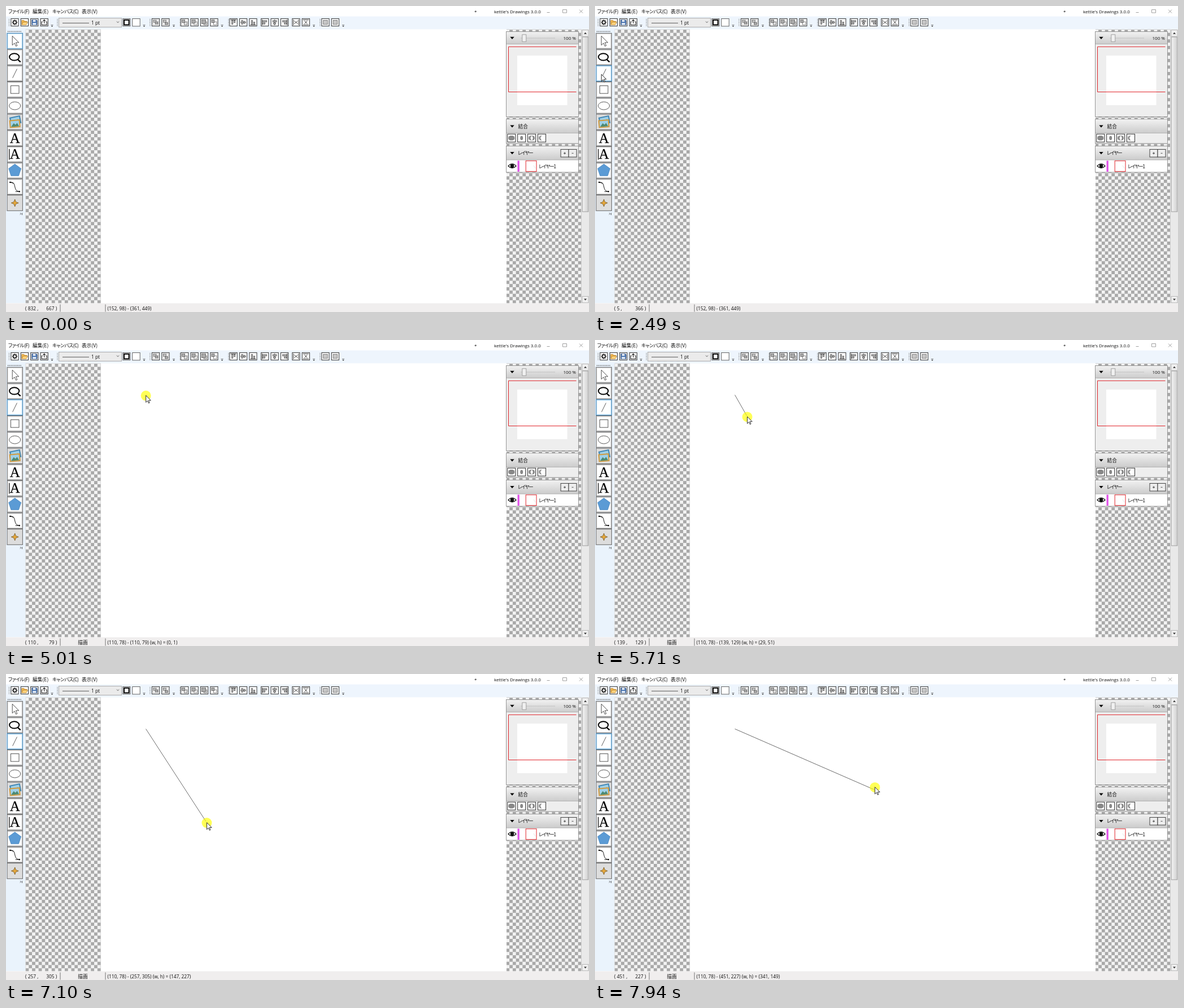
Animation, 1032 px wide and 543 px high, one loop 8000 ms. Source, as an HTML page:

```html
<!DOCTYPE html>
<html lang="ja">
<head>
<meta charset="utf-8">
<style>
html, body { margin: 0; width: 100%; height: 100%; overflow: hidden; background: #fff; }
svg { display: block; width: 100vw; height: 100vh; }
text { font: 8.4px "Open Sans", "Noto Sans", sans-serif; fill: #111; white-space: pre; }
.ja { font: 8.7px "Noto Sans CJK JP", "Noto Sans CJK", sans-serif; }
.kana { font-feature-settings: "palt"; letter-spacing: -.5px; }
.tight { letter-spacing: -1.4px; }
.small { font-size: 8px; }
.serif { font: 25px "Liberation Serif", serif; fill: #000; stroke: #000; stroke-width: .25; }
.dots { stroke-dasharray: 1.3 1.5; }
</style>
</head>
<body>
<svg id="stage" viewBox="0 0 1032 543" preserveAspectRatio="none"></svg>
<script>
const LOOP = 8000, STEP = 70, LAG = 20;
const SCALE = 0.7235, LEFT = 168, TOP = 41, BOTTOM = 527;
const CELL = 8 * SCALE, TOOL_Y = 47.8, TOOL_H = 28.73, GAP = 17.4;
const ENTER = 790, CLICK = 1960, PICK = 2100, PRESS = 4680, DRAG = 5010;
const START = { x: 110, y: 78 };

// Key points of the pointer: time, x, y
const KEYS = [
  [790, 742, 552], [1070, 171.6, 306], [1160, 42, 234], [1600, 11.3, 122], [2620, 11.3, 121],
  [3250, 231, 97], [4480, 247.6, 97.4], [5000, 247.6, 98.2], [6340, 302.6, 189.3],
  [7100, 353.9, 261.7], [7520, 392, 300], [7660, 421, 303], [7940, 494.3, 205.2], [8000, 497, 193]
];
// The screen refreshes every STEP from each of these times on
const RUNS = [0, ENTER, CLICK, 2490, 2620, 3520, 4410, PRESS, DRAG, 6680];

const rect = (x, y, w, h, fill, stroke = 'none', sw = 1) =>
  `<rect x="${x}" y="${y}" width="${w}" height="${h}" fill="${fill}" stroke="${stroke}" stroke-width="${sw}"/>`;
const path = (d, fill = 'none', stroke = 'none', sw = 1, cls = '') =>
  `<path d="${d}" fill="${fill}" stroke="${stroke}" stroke-width="${sw}" class="${cls}"/>`;
const oval = (x, y, rx, ry, fill, stroke = 'none', sw = 1) =>
  `<ellipse cx="${x}" cy="${y}" rx="${rx}" ry="${ry}" fill="${fill}" stroke="${stroke}" stroke-width="${sw}"/>`;
const text = (x, y, s, cls = '', more = '') => `<text x="${x}" y="${y}" class="${cls}" ${more}>${s}</text>`;
const at = (x, y, s, more = '') => `<g transform="translate(${x} ${y}) ${more}">${s}</g>`;
const range = (n, f) => Array.from({ length: n }, (_, i) => f(i));
const ARROW = 'M0 0V17L4 13.2L6.6 19L9 18L6.5 12.2H12Z';

// Closed shape of n corners; radius(i) gives each corner's distance
const ring = (n, radius) => 'M' + range(n, i => {
  const a = i * 2 * Math.PI / n, r = radius(i);
  return `${r * Math.sin(a)} ${-r * Math.cos(a)}`;
}).join('L') + 'Z';

function defs() {
  const grad = (id, a, b, dir) =>
    `<linearGradient id="${id}" ${dir}><stop stop-color="${a}"/><stop offset="1" stop-color="${b}"/></linearGradient>`;
  return `<defs><pattern id="check" x="34.5" y="41.8" width="${2 * CELL}" height="${2 * CELL}" patternUnits="userSpaceOnUse">
    ${rect(0, 0, 2 * CELL, 2 * CELL, '#f3f3f3')}${range(2, i => rect(i * CELL, i * CELL, CELL, CELL, '#a9a9a9')).join('')}</pattern>
    ${grad('head', '#f1f1f1', '#cbcbcb', 'x2="0" y2="1"')}${grad('thumb', '#f4f4f4', '#cfcfcf', '')}</defs>`;
}

function frame() {
  const h = BOTTOM - TOP;
  return rect(0, 0, 1032, 543, '#fff') + rect(0, 18.5, 1032, 23, '#eef5fd') + rect(0, TOP, 34.5, h, '#eaf3fc')
    + at(CELL, 0, rect(34.5 - CELL, 41.5, LEFT - 34.5, h, 'url(#check)'))
    + rect(LEFT, 41.5, 718, h, '#fff') + rect(886, 41.5, 133, h, 'url(#check)')
    + text(4, 13, 'ファイル(F)', 'ja kana') + text(47, 13, '編集(E)', 'ja')
    + text(82, 13, 'キャンバス(C)', 'ja kana') + text(134, 13, '表示(V)', 'ja')
    + text(829, 13, '*', 'small') + text(864, 13, "kettle's Drawings 3.0.0", 'small')
    + path('M957.5 11.5h5M985.5 6.5h7v5.5h-7zM1015 6.5l6 6m0-6l-6 6', 'none', '#8a8a8a', .8);
}

function toolbar() {
  const box = (x, y, w, h, fill = '#aaa') => rect(x, y, w, h, fill, '#555', .7);
  // A row of framed icons with its grip and overflow mark
  const row = (x, icons) => icons.map((s, i) =>
    at(x + i * GAP, 29, rect(-6.6, -6.6, 13.2, 13.2, '#fff', '#333') + s)).join('');
  const grip = x => path(`M${x} 23v13`, 'none', '#777', 1.2, 'dots');
  const more = x => path(`M${x - 2} 33.5h4`, 'none', '#555', .7) + path(`M${x - 1.8} 35h3.6l-1.8 2z`, '#333');

  const files = [
    path(ring(16, i => i % 2 ? 3.4 : 5.2), '#222') + oval(0, 0, 2, 2, '#fff'),
    path('M-5 4V-3.5h4l1 1.5h4v2', '#f3b64c', '#a97824', .7) + path('M-5 4.5l2.5-5h8l-2.5 5z', '#ffd27a', '#a97824', .7),
    path('M-4.5-4.5h8l1.2 1.2v8h-9.2z', '#4e79b5', '#23406e', .8) + rect(-2.5, -4.2, 4.5, 3, '#fff') + rect(-3, 1, 6, 3.5, '#dce7f5'),
    path('M-3-1h-1.5v5.5h9V-1H3M0 2v-6M-2.3-2L0-4.6L2.3-2', 'none', '#222', 1.1)
  ];
  const groups = range(2, i => path('M-4.5-4.5h9v9h-9z', 'none', '#777', .8, 'dots')
    + box(-4, -4, 5, 4, '#ccc') + box(-1, i - 1, 5, 4));
  const orders = range(4, i => box(-1, -1, 5.5, 5.5, i % 2 ? '#fff' : '#ddd') + box(-4.5, -4.5, 5 + i % 3, 5 + i % 3));
  // Two bars lined up on side -1, 0 or 1
  const align = side => path(`M-5 ${side * 4.6}h10`, 'none', '#333')
    + [7, 4].map((len, i) => box(i * 4 - 3.2, side * (3.5 - len / 2) - len / 2, 2.4, len)).join('');
  const flip = s => `<g transform="matrix(0 1 1 0 0 0)">${s}</g>`;
  const rows = [-1, 0, 1].map(align);
  const spread = path('M-4.5-5v10M4.5-5v10M-3-2.5L0 0L-3 2.5M3-2.5L0 0L3 2.5', 'none', '#333', .9);

  return [5.5, 91, 255, 308, 394, 556].map(grip).join('') + [81.5, 244.5, 297, 382.5, 545, 597].map(more).join('')
    + row(15.5, files) + row(265, groups) + row(316.2, orders) + row(402.6, rows)
    + row(458.2, rows.map(flip)) + row(513.4, [spread, flip(spread)]) + row(565.4, range(2, () => box(-3.7, -3.7, 7.4, 7.4, '#c8c8c8')))
    + rect(93.5, 21.5, 111, 16, '#ebebeb', '#acacac') + path('M100 30.3h47', 'none', '#333', .8)
    + text(151, 33, '1 pt') + path('M196 27.5l2 2l2-2', 'none', '#444', .9)
    + rect(206.8, 22.6, 13, 13, '#fff', '#555') + rect(209, 24.8, 8.6, 8.6, '#fff', '#000', 2)
    + rect(223.8, 22.5, 13.4, 13.4, '#fff', '#555', .9);
}

function tools() {
  const letter = text(0, 8.2, 'A', 'serif', 'text-anchor="middle"');
  const photo = (x, y, frame, turn) => at(x, y, rect(-8.5, -6, 17, 12, '#9fd0e8', frame, 2)
    + path('M-7 5L-2-1L1 2L4-1L7 5Z', '#4d8a72'), `rotate(${turn})`);
  const icons = [
    at(-4.5, -9, path(ARROW, '#fff', '#333', .9), 'scale(.96)'),
    oval(-1, -.5, 8.6, 6.2, 'none', '#000', 2) + path('M5 4L10 8.5', 'none', '#000', 2.4),
    path('M3.8-8L-4 8', 'none', '#333', .8),
    rect(-7.3, -6.8, 14.6, 13.6, '#fff', '#444', .9),
    oval(0, 0, 10, 7, '#fff', '#444', .9),
    photo(1, -3, '#3f86b4', -12) + photo(0, 3, '#d39a3c', -5),
    letter,
    letter + path('M-9.8-9.5V9.5', 'none', '#000', 1.2),
    path(ring(5, () => 11.5), '#5b9bd5', '#4685bd', .8),
    path('M-8-8C4-9-4 7 7 8.5M-8-8L-2-6M1 8.5H8', 'none', '#000', .9) + rect(-9.5, -9, 2.2, 2.2, '#000') + rect(7, 7.4, 2.2, 2.2, '#000'),
    path(ring(8, i => i % 2 ? 2.5 : 6.5), '#e9a93a', '#6d5223', .8)
  ];
  const grey = [5, 10];
  return path('M3 45.3H28', 'none', '#555', 1.5, 'dots')
    + icons.map((s, i) => at(15.7, TOOL_Y + TOOL_H * (i + .5),
      '<rect class="tool" x="-13.7" y="-13.8" width="27.4" height="27.6" stroke-width="1.1"/>'
      + (grey.includes(i) ? '' : rect(-11.7, -11.8, 23.4, 23.6, '#fff')) + s)).join('')
    + path('M25 367l1.5 1.7l-1.5 1.7M28.5 367v4', 'none', '#333', .8);
}

function panels() {
  const panel = (y, h, head, fill) => rect(885.5, y, 128, h, fill, '#8d8d8d', .9)
    + rect(886, y + .5, 127, head, 'url(#head)') + path(`M886 ${y + head}h127`, 'none', '#aaa', .7)
    + path(`M892.3 ${y + head / 2 - 1.8}h7.4l-3.7 4.4z`, '#000');
  const zoom = panel(45.5, 151, 22, '#eee') + path('M911 57h61', 'none', '#c2c2c2', 1.2)
    + rect(913.8, 50.8, 7, 12.4, '#f0f0f0', '#999', .9) + text(986.5, 59.8, '100 %', 'small')
    + rect(905, 88, 88.5, 88, '#fff') + path('M1009.5 72.3H889.5V152.5H1009.5', 'none', '#e0242a');

  const pair = oval(-1.2, 0, 4.3, 4.3, '#888') + oval(1.2, 0, 4.3, 4.3, '#888');
  const marks = [pair, oval(0, 0, 2.5, 3.8, '#888'), pair + oval(0, 0, 2, 3.6, '#fff'),
    oval(-1, 0, 4.2, 4.2, '#888') + oval(1.8, 0, 4.2, 4.2, '#fff')];
  const merge = panel(201, 43, 24.5, '#eee') + text(906.5, 216.5, '結合', 'ja')
    + marks.map((m, i) => at(894.8 + i * 17.9, 234.3, rect(-7, -7, 14, 14, '#fff', '#333') + m)).join('');

  const layers = panel(248.5, 46.5, 24.5, '#fff') + text(906, 264, 'レイヤー', 'ja kana tight')
    + range(2, i => rect(982 + i * 14, 254.5, 14, 13.5, '#eee', '#333', .9)).join('')
    + path('M987 261.3h4M989 259.3v4M1001.5 261.3h3', 'none', '#222', .8)
    + path('M889 284Q896 276 903 284Q896 291 889 284Z', '#fff', '#111', 1.2) + oval(896, 283.7, 3.3, 3.4, '#111')
    + rect(905.5, 274.5, 3.3, 19.5, '#e052e8') + rect(920.2, 274.8, 18.8, 18.8, '#fff', '#e0242a')
    + path('M934 283l3 5', 'none', '#ccc', .5) + text(943, 287.5, 'レイヤー1', 'ja kana tight');
  return zoom + merge + layers;
}

function edges() {
  const button = (y, s) => at(1025.5, y, rect(-5.5, -5.7, 11, 11.4, '#f0f0f0', '#aaa', .8) + path(s, '#333'));
  return rect(1019, 41.5, 13, 486, '#e9e9e9') + button(48.3, 'M-2.5 1.5l2.5-3l2.5 3z')
    + rect(1020.3, 55, 10.5, 310, 'url(#thumb)', '#989898', .9) + button(521, 'M-2.5-1.5l2.5 3l2.5-3z')
    + rect(0, 527.5, 1032, 16, '#f0eeee') + path('M96 529.5v13M176 529.5v13', 'none', '#666', .9)
    + text(34, 539.5, '', '', 'id="posX"') + text(90.3, 539.5, '', '', 'id="posY" text-anchor="end"')
    + text(136, 539.5, '描画', 'ja', 'id="mode" text-anchor="middle"') + text(179.5, 539.5, '', '', 'id="info"');
}

function pointer() {
  return `<path id="line" stroke="#444" stroke-width=".8"/>
    <g id="pointer"><circle id="press" cy=".5" r="9" fill="#ff0" fill-opacity=".66"/>
    <g transform="scale(${SCALE})">${path(ARROW, '#fff', '#111', 1.2)}</g></g>`;
}

document.getElementById('stage').innerHTML =
  defs() + frame() + toolbar() + tools() + panels() + edges() + pointer();

const [posX, posY, mode, info, line, hand, press] =
  ['posX', 'posY', 'mode', 'info', 'line', 'pointer', 'press'].map(id => document.getElementById(id));
const buttons = [...document.querySelectorAll('.tool')];

function snap(t) {
  const start = RUNS.filter(r => r <= t).pop();
  return start + Math.floor((t - start) / STEP) * STEP;
}

// Monotone cubic through the keys, so that rests stay still
function follow(t, axis) {
  const last = KEYS.length - 1;
  const slope = i => (KEYS[i + 1][axis] - KEYS[i][axis]) / (KEYS[i + 1][0] - KEYS[i][0]);
  const tangent = i => {
    if (i === 0 || i === last) return slope(i && last - 1);
    const a = slope(i - 1), b = slope(i);
    return a * b > 0 ? 2 * a * b / (a + b) : 0;
  };
  const time = Math.min(Math.max(t, KEYS[0][0]), KEYS[last][0] - 1);
  const i = KEYS.findIndex(k => k[0] > time) - 1;
  const span = KEYS[i + 1][0] - KEYS[i][0], u = (time - KEYS[i][0]) / span, v = 1 - u;
  return KEYS[i][axis] * v * v * (1 + 2 * u) + KEYS[i + 1][axis] * u * u * (1 + 2 * v)
    + span * u * v * (tangent(i) * v - tangent(i + 1) * u);
}

const pointAt = t => ({ x: follow(t, 1), y: follow(t, 2) });

function docAt(t) {
  const p = pointAt(t);
  if (p.x > LEFT && p.y < BOTTOM)
    return { x: Math.round((p.x - LEFT) / SCALE), y: Math.round((p.y - TOP) / SCALE) };
  return t < 1000 ? { x: 832, y: 667 } : { x: 5, y: 366 };
}

const show = (el, on) => el.setAttribute('visibility', on ? 'visible' : 'hidden');

function draw(time) {
  const t = snap(time), tip = pointAt(t + LAG), doc = docAt(t), drawing = t >= DRAG;
  show(hand, t >= ENTER);
  show(press, (t >= CLICK && t < PICK) || t >= PRESS);
  hand.setAttribute('transform', `translate(${tip.x} ${tip.y})`);

  const selected = t < PICK ? 0 : 2;
  const hover = t >= ENTER && tip.x < 30 ? Math.floor((tip.y - TOOL_Y) / TOOL_H) : -1;
  buttons.forEach((b, i) => {
    const lit = i === selected || i === hover;
    b.setAttribute('fill', lit ? '#d3ecfb' : '#ddd');
    b.setAttribute('stroke', lit ? '#3c7fb1' : '#707070');
  });

  posX.textContent = `( ${doc.x} ,`;
  posY.textContent = `${doc.y} )`;
  show(mode, drawing);
  show(line, drawing);
  info.textContent = drawing
    ? `(${START.x}, ${START.y}) - (${doc.x}, ${doc.y}) (w, h) = (${doc.x - START.x}, ${doc.y - START.y})`
    : '(152, 98) - (361, 449)';
  const spot = p => `${LEFT + p.x * SCALE} ${TOP + p.y * SCALE}`;
  line.setAttribute('d', `M${spot(START)}L${spot(doc)}`);
}

const begin = performance.now();
function tick() {
  draw((performance.now() - begin) % LOOP);
  requestAnimationFrame(tick);
}
tick();
</script>
</body>
</html>
```
